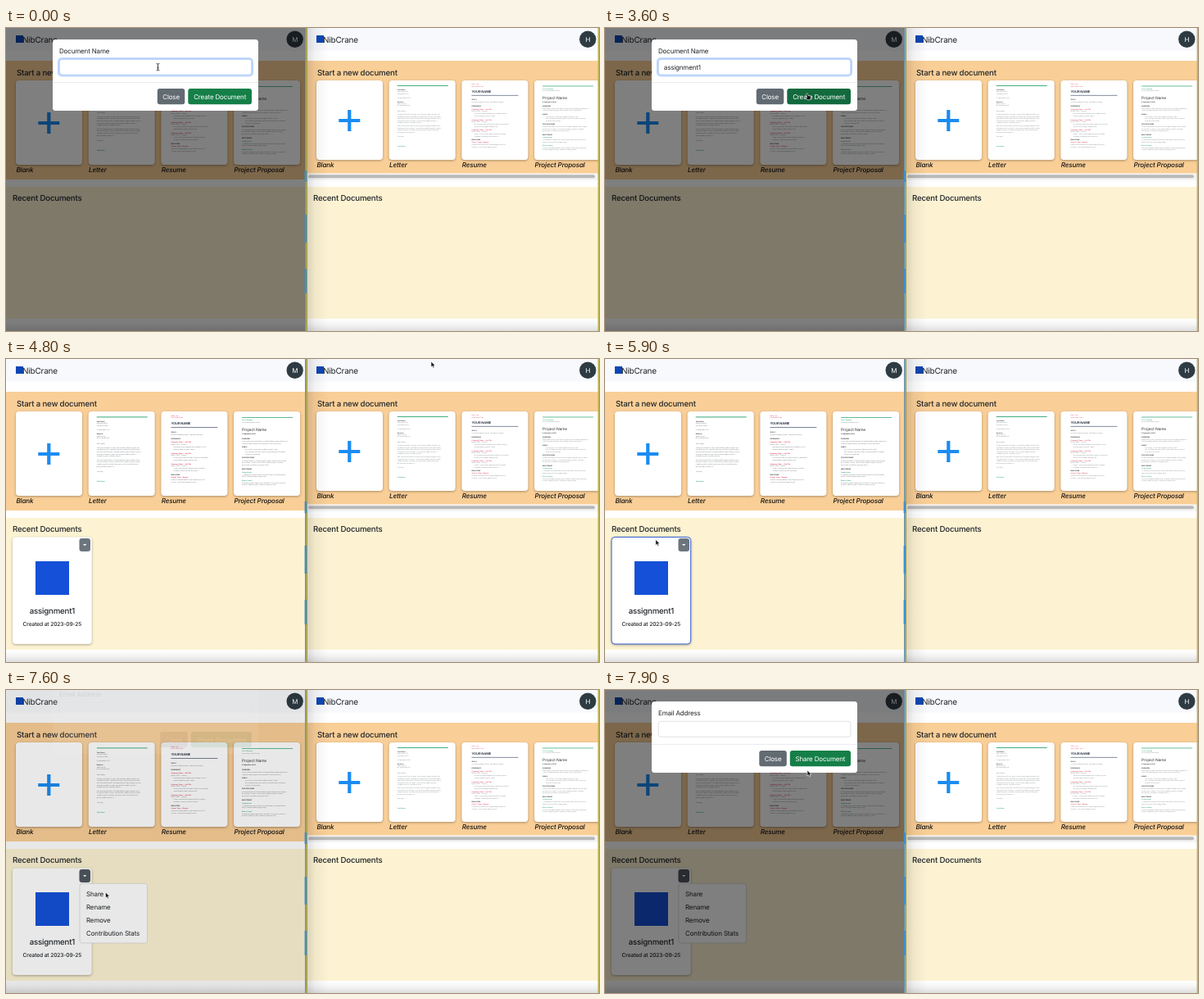
Animation of 724x370 px, one loop 8000 ms. Source, as an HTML page:

```html
<!DOCTYPE html>
<html lang="en">
<head>
<meta charset="utf-8">
<title>Document sharing demo</title>
<style>
html, body { margin: 0; width: 100%; height: 100%; overflow: hidden; background: #fff; }
svg { display: block; width: 724px; height: 370px; }
text { font-family: Inter, Roboto, "Liberation Sans", sans-serif; letter-spacing: -.02em;
  text-rendering: geometricPrecision; white-space: pre; }
.card { filter: drop-shadow(0 1.5px 1.5px rgba(0,0,0,.32)); }
</style>
</head>
<body>
<svg id="stage" viewBox="0 0 724 370" xmlns="http://www.w3.org/2000/svg">
  <defs>
    <linearGradient id="edge">
      <stop offset="0" stop-color="#000" stop-opacity=".13"/>
      <stop offset=".35" stop-color="#000" stop-opacity=".05"/>
      <stop offset="1" stop-color="#000" stop-opacity="0"/>
    </linearGradient>
    <linearGradient id="foot" x2="0" y2="1">
      <stop offset="0" stop-color="#fff"/>
      <stop offset=".45" stop-color="#f6f6f6"/>
      <stop offset="1" stop-color="#dedede"/>
    </linearGradient>
  </defs>
</svg>
<script>
const stage = document.getElementById('stage');

function add(parent, tag, attrs = {}) {
  const el = document.createElementNS('http://www.w3.org/2000/svg', tag);
  for (const k in attrs) el.setAttribute(k, attrs[k]);
  parent.append(el);
  return el;
}
const group = (p, attrs) => add(p, 'g', attrs);
const box = (p, x, y, width, height, fill, attrs) =>
  add(p, 'rect', { x, y, width, height, fill, ...attrs });
const path = (p, d, attrs) => add(p, 'path', { d, ...attrs });

// y is the vertical middle of the capitals
function label(p, str, x, y, size = 8, attrs = {}) {
  const el = add(p, 'text', { x, y: y + size * .36, 'font-size': size, fill: '#212529', ...attrs });
  el.textContent = str;
  return el;
}

// ---- template thumbnails ----
const filler = 'Lorem ipsum dolor sit amet, consectetuer adipiscing elit, sed diam nonummy nibh euismod ' +
  'tincidunt ut laoreet dolore magna aliquam erat volutpat. Ut wisi enim ad minim veniam, quis nostrud. ';
const GREEN = '#37a977', RED = '#e0405a', GREY = '#80868b';

const tiny = (p, str, x, y, fill = GREY, weight = 400) =>
  label(p, str, x, y, 1.9, { fill, 'font-weight': weight });

function lines(p, x, y, lengths, gap = 2.7) {
  lengths.forEach((n, i) => {
    const from = (i * 37 + Math.round(y) * 5) % 110;
    tiny(p, filler.slice(from, from + n).trim(), x, y + i * gap);
  });
}
const head = (p, str, x, y, fill = '#333') => tiny(p, str, x, y, fill, 700);

function letter(p) {
  box(p, 10, 6.4, 62, 1, GREEN);
  head(p, 'Your Name', 10, 12);
  lines(p, 10, 14.6, [15, 16], 2.4);
  tiny(p, '4 September 2023', 10, 22.5);
  head(p, 'Receiver', 10, 27.5);
  lines(p, 10, 30, [14, 17], 2.4);
  tiny(p, 'Dear reader,', 10, 39.5);
  lines(p, 10, 44, [62, 60, 63, 58, 34]);
  lines(p, 10, 59, [61, 63, 59, 26]);
  tiny(p, 'Sincerely,', 10, 73);
  head(p, 'Your Name', 10, 85, GREEN);
}

function resume(p) {
  tiny(p, 'Hello, I am', 12, 5, RED);
  tiny(p, 'Any Street, Town', 12, 7.4, RED);
  label(p, 'YOUR NAME', 12, 15, 4, { 'font-weight': 700, fill: '#333b4d' });
  box(p, 12, 19, 57, .8, '#5c6680');
  head(p, 'SKILLS', 12, 25);
  lines(p, 12, 28, [44]);
  head(p, 'EXPERIENCE', 12, 33.5);
  [37.5, 51, 64].forEach(y => {
    head(p, 'Company, Town — Job Title', 12, y, RED);
    tiny(p, 'Month 20XX - Present', 12, y + 2.7);
    lines(p, 15, y + 5.8, [47, 32]);
  });
  head(p, 'EDUCATION', 12, 77);
  head(p, 'School, Town — Degree', 12, 80.5, RED);
  lines(p, 12, 83.5, [48, 38]);
}

function proposal(p) {
  box(p, 10, 7, 62, .8, GREEN);
  tiny(p, 'Your Company', 10, 10.5, GREEN, 600);
  lines(p, 10, 13, [21]);
  label(p, 'Project Name', 10, 22.4, 4.9, { fill: '#333' });
  head(p, '4 September 2023', 10, 27.5);
  head(p, 'OVERVIEW', 10, 33);
  lines(p, 10, 36.4, [62, 55]);
  head(p, 'GOALS', 10, 43.5);
  lines(p, 14, 46.8, [48, 56, 22]);
  head(p, 'SPECIFICATIONS', 10, 56.5);
  lines(p, 10, 60, [62, 60, 37]);
  head(p, 'MILESTONES', 10, 70);
  head(p, 'Lorem ipsum', 10, 74, GREEN);
  lines(p, 10, 77, [61, 35]);
  head(p, 'Dolor sit amet', 10, 84, GREEN);
  lines(p, 10, 87, [62, 48]);
}

function blank(p, w, h) {
  path(p, `M40.3 ${h / 2 - 12.5}v26M27.3 ${h / 2 + .5}h26`,
    { stroke: '#1b8cf2', 'stroke-width': 4.2 });
}

const templates = [['Blank', blank], ['Letter', letter], ['Resume', resume], ['Project Proposal', proposal]];

// ---- one browser window ----
function pane(x, width, initial, avatarX, cardH, bandEnd) {
  const p = group(stage, { transform: `translate(${x})` });
  box(p, 0, 0, width, 370, '#fff');
  box(p, 0, 0, width, 27.5, '#f8f9fc');
  box(p, 12, 9, 9, 9, '#0d47b5');
  label(p, 'NibCrane', 20, 14, 10);
  add(p, 'circle', { cx: avatarX, cy: 13.7, r: 10.2, fill: '#2e3b43' });
  label(p, initial, avatarX, 14, 8, { fill: '#fff', 'text-anchor': 'middle' });
  box(p, 0, 40, width, bandEnd - 40, '#facf97');
  label(p, 'Start a new document', 13, 54.3, 9.7, { 'font-weight': 500 });
  templates.forEach(([name, draw], i) => {
    const cx = 12 + i * 88.7;
    const card = group(p, { transform: `translate(${cx} 64)` });
    box(card, 0, 0, 81, cardH, '#fff', { rx: 4, class: 'card' });
    const sheet = group(card, draw === blank ? {} : { transform: `scale(1 ${cardH / 103})` });
    draw(sheet, 81, cardH);
    label(p, name, cx + .4, 70 + cardH, 8.1, { 'font-style': 'italic', 'font-weight': 500, fill: '#111' });
  });
  box(p, 0, 194, width, 161, '#fdf3d3');
  label(p, 'Recent Documents', 8, 207.5, 9.7, { 'font-weight': 500 });
  box(p, 0, 355, width, 15, 'url(#foot)');
  return p;
}

const right = pane(367, 357, 'H', 343.3, 97, 177.5);
box(right, 0, 178, 357, 8, '#f4f4f4');
box(right, 2, 179.3, 350, 4, '#b9b9b9', { rx: 2 });
box(right, 1, 0, 26, 370, 'url(#edge)');

const left = pane(0, 366, 'M', 352.7, 103, 185);

// ---- saved document and its menu ----
const saved = group(left);
const savedBox = box(saved, 8, 217.5, 96.7, 130.5, '#fff', { rx: 4, class: 'card', 'stroke-width': 1 });
box(saved, 36, 247, 41, 41, '#1450d8');
label(saved, 'assignment1', 56.4, 307.8, 9.7, { 'font-weight': 500, 'text-anchor': 'middle' });
label(saved, 'Created at 2023-09-25', 56.4, 323.5, 6.7, { 'font-weight': 500, 'text-anchor': 'middle' });
const toggle = box(saved, 89.5, 219, 13.5, 16, '#6c757d', { rx: 3 });
path(saved, 'M94 226h4.4l-2.2 2.3z', { fill: '#fff' });

const menu = group(left);
box(menu, 90, 236.3, 82.5, 72.7, '#fff', { rx: 3, stroke: '#ccc', 'stroke-width': .6 });
['Share', 'Rename', 'Remove', 'Contribution Stats'].forEach((s, i) => label(menu, s, 98, 249 + i * 16));

const backdrop = box(left, 0, 0, 366, 370, '#000');

// ---- window edges ----
box(stage, 365, 0, 1.2, 370, '#5b8fb5');
box(stage, 366.2, 0, 1.8, 370, '#a39c48');
[[174, 14], [228, 34], [294, 30]].forEach(([y, h]) => box(stage, 364.6, y, 2.4, h, '#3d8fd0'));
box(stage, 722.6, 0, 1.4, 370, '#bdb44e');

// ---- dialogs ----
function dialog(title, action, actionX, closeX, focused) {
  const g = group(stage);
  box(g, 57, 14, 251, 87, '#fff', { rx: 3.5 });
  label(g, title, 65, 28.5);
  if (focused) box(g, 64, 37, 237, 21.5, 'none', { rx: 4, stroke: '#c2dbfe', 'stroke-width': 2.2 });
  box(g, 65.2, 38.2, 234.8, 19, '#fff',
    { rx: 3, stroke: focused ? '#86b0f0' : '#d0d5da', 'stroke-width': .7 });
  box(g, 57, 66, 251, .6, '#dee2e6');
  box(g, closeX, 74, 33.5, 19.3, '#626a72', { rx: 3 });
  label(g, 'Close', closeX + 16.8, 84, 8, { fill: '#fff', 'text-anchor': 'middle' });
  const button = box(g, actionX, 74, 300 - actionX, 19.3, '#157f48', { rx: 3 });
  label(g, action, (actionX + 300) / 2, 84, 8, { fill: '#fff', 'text-anchor': 'middle' });
  return { g, button };
}
const create = dialog('Document Name', 'Create Document', 222.3, 184.8, true);
const share = dialog('Email Address', 'Share Document', 225.8, 188.3, false);
const typed = label(create.g, '', 71.8, 48);
const caret = box(create.g, 0, 43.3, .7, 9.4, '#111');

// ---- pointers ----
const outline = { fill: '#111', stroke: '#fff', 'stroke-width': .6, 'stroke-linejoin': 'round' };
const pointer = group(stage);
const shapes = {
  beam: path(pointer, 'M-1.8-4Q0-4 0-3V3.4Q0 4.4-1.8 4.4M1.8-4Q0-4 0-3M0 3.4Q0 4.4 1.8 4.4M-1 1.2H1',
    { fill: 'none', stroke: '#111', 'stroke-width': .8 }),
  arrow: path(pointer, 'M0 0V7L1.6 5.6 2.7 8 3.9 7.5 2.9 5.1H5z', outline),
  hand: path(pointer, 'M0 0Q1-.7 1.4.4L2 2.4 4.6 3Q5.5 3.3 5.3 4.6L4.8 7.8H1.2L-1.5 4.7Q-1.2 3.8 0 4.5L.6 4.8-.4 1Z', outline),
};

// ---- timeline: [time, ...values] ----
const typing = [[0, ''], [1100, 'a'], [1400, 'as'], [1500, 'ass'], [1600, 'assi'], [1800, 'assig'],
  [1900, 'assign'], [2100, 'assignme'], [2300, 'assignment'], [2500, 'assignment1']];
const caretOn = [[0, 0], [100, 1], [700, 0], [1100, 1], [3000, 0]];
const shape = [[0, 'beam'], [1200, ''], [3000, 'beam'], [3200, 'arrow'], [3400, 'hand'],
  [3900, 'arrow'], [6300, 'hand'], [7100, 'arrow']];
const route = [[0, 185.5, 47.5], [3000, 185.5, 47.5], [3400, 244, 79], [3600, 246, 80], [3900, 247, 80],
  [4700, 513, 25], [4800, 519, 3], [4900, 519, 3], [5600, 37, 214], [6300, 95, 229],
  [6800, 96.5, 231], [7000, 98, 233], [7400, 121.5, 247], [7600, 121.5, 247], [7900, 247, 98]];
// opacity, vertical shift
const createFade = [[0, 1, 0], [3600, 1, 0], [3700, .35, -14], [3800, 0, -25]];
const shareFade = [[0, 0, -25], [7500, 0, -25], [7600, .08, -23], [7700, .45, -12], [7800, .88, -3], [7900, 1, 0]];
const shade = [[0, .5], [3600, .5], [3800, 0], [7400, 0], [7500, .02], [7600, .09], [7700, .28], [7800, .44], [7900, .5]];

const stepAt = (table, t) => table.filter(r => r[0] <= t).pop()[1];

function tween(table, t) {
  const i = table.findIndex(r => r[0] > t);
  if (i < 0) return table[table.length - 1].slice(1);
  const a = table[i - 1], b = table[i];
  const k = (t - a[0]) / (b[0] - a[0]);
  return a.slice(1).map((v, j) => v + (b[j + 1] - v) * k);
}

const show = (el, on) => el.setAttribute('visibility', on ? 'visible' : 'hidden');

function fade(el, [opacity, dy]) {
  el.setAttribute('opacity', opacity);
  el.setAttribute('transform', `translate(0 ${dy})`);
}

function render(t) {
  typed.textContent = stepAt(typing, t);
  caret.setAttribute('x', 71.8 + (typed.textContent ? typed.getComputedTextLength() : 0));
  caret.setAttribute('opacity', stepAt(caretOn, t));
  fade(create.g, tween(createFade, t));
  fade(share.g, tween(shareFade, t));
  backdrop.setAttribute('opacity', tween(shade, t)[0]);
  create.button.setAttribute('fill', t >= 3400 ? '#126a3d' : '#157f48');

  show(saved, t >= 3900);
  savedBox.setAttribute('stroke', t >= 5700 && t < 7500 ? '#3a62d0' : 'none');
  toggle.setAttribute('fill', t >= 6600 ? '#50575e' : '#6c757d');
  show(menu, t >= 6700);

  const [x, y] = tween(route, t);
  pointer.setAttribute('transform', `translate(${x} ${y})`);
  const current = stepAt(shape, t);
  for (const name in shapes) show(shapes[name], name === current);
}

function tick() {
  render(Math.floor(performance.now() % 8000 / 100) * 100);
  requestAnimationFrame(tick);
}
tick();
</script>
</body>
</html>
```
